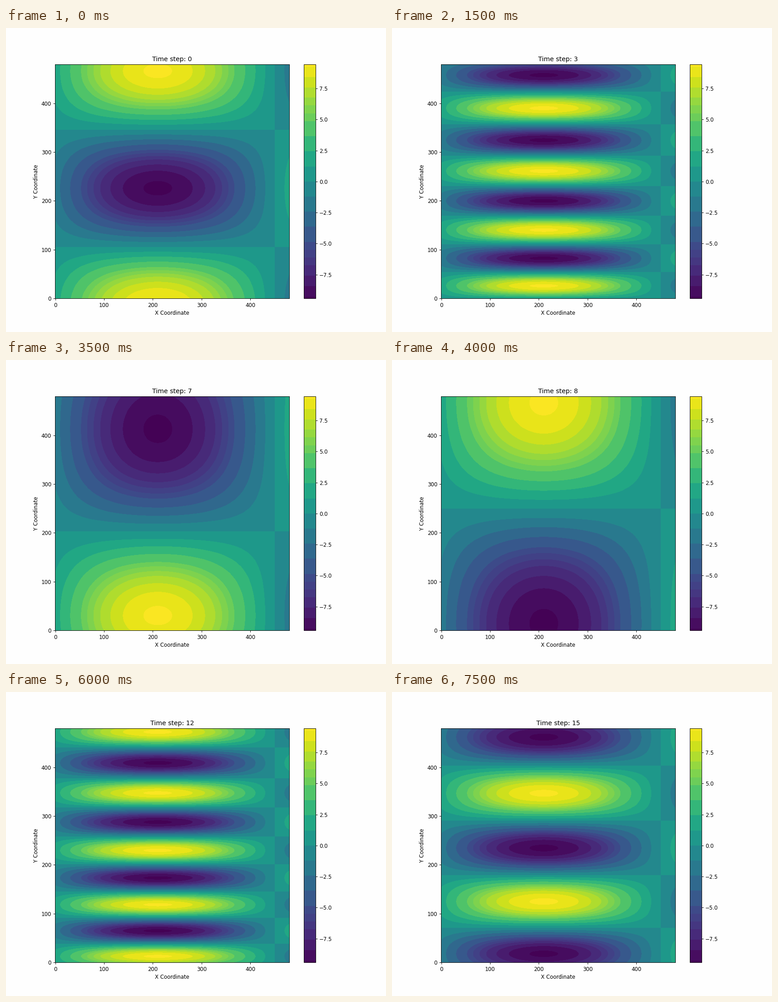
Write a matplotlib script that moves like this. It is 837 px wide and 669 px high and loops after 8000 ms.

```python
import numpy as np
import matplotlib.pyplot as plt
from matplotlib.animation import FuncAnimation
from matplotlib.colors import ListedColormap

W, H, DPI = 837, 669, 83.7
SIZE = 480
STEPS, STEP_MS = 16, 500
PEAK = 3 * np.pi
OMEGA = 2 * np.pi * 79 / 140  # swing of the stripes per time step

plt.rcParams["font.family"] = "DejaVu Sans"


def banded_viridis(n=2048):
    """Viridis in flat bands, mirrored about zero and finer near the ends."""
    upper = np.cumsum(np.repeat([.129, .067, .088], [4, 3, 3]))
    edges = np.concatenate([[-1], -upper[::-1], [0], upper, [1]])
    mids = (edges[:-1] + edges[1:]) / 2
    values = (np.arange(n) + .5) / n * 2 - 1
    band = np.digitize(values, edges) - 1
    return ListedColormap(plt.get_cmap("viridis")((mids[band] + 1) / 2))


def field(step):
    x = y = np.arange(SIZE)
    u = y - SIZE / 2
    across = np.sin(np.pi * (x / SIZE + 1 / 16))
    # Phase in half turns: a resting wave plus a swinging chirp
    chirp = -26.985 + .02179 * u - 4.3e-6 * u ** 2
    phase = 1 / 16 + 2 * y / SIZE + np.sin(OMEGA * step) * chirp
    return PEAK * np.outer(np.cos(np.pi * phase), across)


# The margin keeps rounding from dropping a pixel
fig = plt.figure(figsize=((W + .01) / DPI, (H + .01) / DPI), dpi=DPI,
                 facecolor="#fefefe")
ax = fig.add_axes([.129, .11, .616, .77])
image = ax.imshow(field(0), origin="lower", cmap=banded_viridis(),
                  vmin=-PEAK, vmax=PEAK, aspect="auto")
ax.set_xticks(range(0, SIZE, 100))
ax.set_yticks(range(0, SIZE, 100))
ax.set_xlabel("X Coordinate")
ax.set_ylabel("Y Coordinate")
title = ax.set_title("Time step: 0")
fig.colorbar(image, cax=fig.add_axes([.78375, .11, .0308, .77]),
             ticks=np.arange(-7.5, 8, 2.5))


def update(step):
    image.set_data(field(step))
    title.set_text(f"Time step: {step}")
    return image, title


anim = FuncAnimation(fig, update, frames=STEPS, interval=STEP_MS,
                     repeat=True, repeat_delay=0, blit=False)
plt.show()
```
